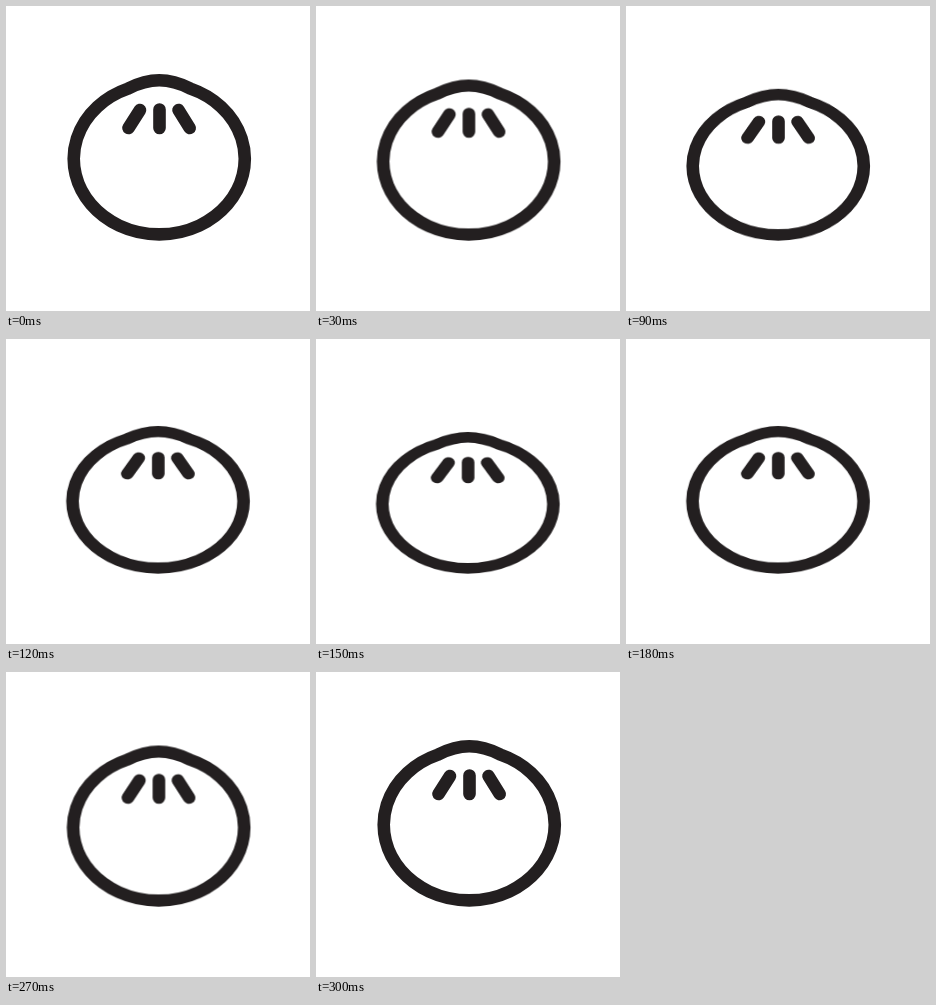
Recreate the animation shown at these times as an HTML page. Size 304 by 305 pixels, loop 0.33 s.

```html
<!DOCTYPE html>
<html lang="en">
<head>
<meta charset="utf-8">
<title>Squashing bun</title>
<style>
html, body {
  margin: 0;
  width: 100%;
  height: 100%;
  overflow: hidden;
  background: #fff;
}
svg {
  display: block;
  width: 304px;
  height: 305px;
}
.bun {
  fill: none;
  stroke: #231f20;
  stroke-width: 12.6;
  stroke-linecap: round;
  stroke-linejoin: round;
  transform-origin: 153px 234.5px;
  animation: squash 330ms step-end infinite;
}
/* eleven held poses of 30 ms, down and back up */
@keyframes squash {
  0%, 90.9%, 100% { transform: none; }
  9.09%, 81.81%   { transform: translateX(-.6px) scaleY(.967); }
  18.18%, 72.72%  { transform: translateX(-1px) scaleY(.935); }
  27.27%, 63.63%  { transform: translateX(-1px) scaleY(.911); }
  36.36%, 54.54%  { transform: translateX(-1.2px) scaleY(.886); }
  45.45%          { transform: translateX(-1.4px) scaleY(.85); }
}
</style>
</head>
<body>
<svg viewBox="0 0 304 305">
  <g class="bun">
    <path d="M122 82.6C132.5 77.3 141.5 74.3 153.25 74.3S174 77.3 184.5 82.6A85.5 75.5 0 1 1 122 82.6Z"/>
    <path d="M134 104L122.5 122M153.5 103.5V122M172.5 104L183.7 122"/>
  </g>
</svg>
</body>
</html>
```
